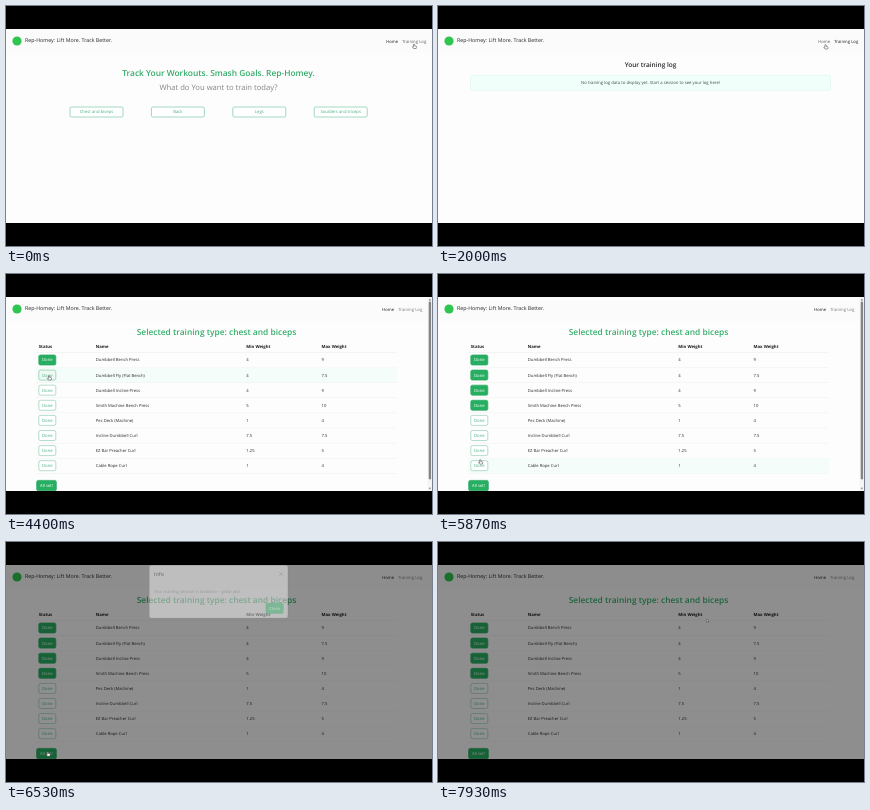
An HTML page with a canvas for the animation above (8000 ms loop, 426 by 240 pixels).

```html
<!DOCTYPE html>
<html lang="en">
<head>
<meta charset="utf-8">
<title>Training log</title>
<style>
html, body { margin: 0; width: 100%; height: 100%; overflow: hidden; background: #000; }
canvas { display: block; width: 100vw; height: 100vh; }
</style>
</head>
<body>
<canvas id="stage"></canvas>
<script>
const W = 426, H = 240, LOOP = 8000;
const TOP = 23, BOTTOM = 217;
const canvas = document.getElementById('stage');
const ctx = canvas.getContext('2d');
const FONT = '"Open Sans", "Noto Sans", sans-serif';
const GREEN = '#27ae60', TEAL = '#45b083', INK = '#25282b';
const BRAND = 'Rep-Homey';

const GROUPS = ['Chest and biceps', 'Back', 'Legs', 'Soulders and triceps'];
const EXERCISES = [
  ['Dumbbell Bench Press', 4, 9],
  ['Dumbbell Fly (Flat Bench)', 4, 7.5],
  ['Dumbbell Incline Press', 4, 9],
  ['Smith Machine Bench Press', 5, 10],
  ['Pec Deck (Machine)', 1, 4],
  ['Incline Dumbbell Curl', 7.5, 7.5],
  ['EZ Bar Preacher Curl', 1.25, 5],
  ['Cable Rope Curl', 1, 4]
];

// Moments of the session, in ms
const T = { log: 130, home: 2130, group: 3330, modal: 6270, close: 7760 };
const DONE_AT = [4130, 4530, 4970, 5420];
// Pointer stops: time, x, y
const PATH = [
  [0, 408, 38], [200, 408, 38], [870, 335, 84], [1000, 328, 87], [1200, 328, 87],
  [1900, 387.5, 38.5], [2200, 387.5, 38.5], [2910, 105, 107], [3450, 105, 107],
  [3950, 43, 87], [4180, 43, 87], [4360, 43, 101.5], [4580, 43, 101.5],
  [4800, 43, 116.5], [5020, 43, 116.5], [5260, 43, 131.5], [5480, 43, 131.5],
  [6100, 41.8, 209.7], [6930, 41.8, 209.7], [7190, 280.6, 83.3], [7260, 280.6, 83.3],
  [7560, 268.8, 77], [8000, 268.8, 77]
];

const clamp = v => Math.max(0, Math.min(1, v));
const ramp = (t, start, length) => clamp((t - start) / length);
const ease = p => p * p * (3 - 2 * p);

function pointerAt(t) {
  let i = 1;
  while (i < PATH.length - 1 && PATH[i][0] < t) i++;
  const [t0, x0, y0] = PATH[i - 1], [t1, x1, y1] = PATH[i];
  const p = ease(clamp((t - t0) / (t1 - t0)));
  return { x: x0 + (x1 - x0) * p, y: y0 + (y1 - y0) * p };
}

function text(str, x, y, size, color = INK, weight = 400, align = 'left') {
  ctx.font = `${weight} ${size}px ${FONT}`;
  ctx.textRendering = 'geometricPrecision';
  ctx.textAlign = align;
  ctx.textBaseline = 'alphabetic';
  ctx.fillStyle = color;
  ctx.fillText(str, x, y + size * 0.35);
}

function box(x, y, w, h, r, fill, stroke, line = 0.5) {
  ctx.beginPath();
  ctx.roundRect(x, y, w, h, r);
  if (fill) { ctx.fillStyle = fill; ctx.fill(); }
  if (stroke) { ctx.strokeStyle = stroke; ctx.lineWidth = line; ctx.stroke(); }
}

function rect(x, y, w, h, color) {
  ctx.fillStyle = color;
  ctx.fillRect(x, y, w, h);
}

// Outline button that fills by the given amount
function button(label, x, y, w, h, fill, edge = TEAL) {
  box(x, y, w, h, 1.6, '#fff', edge);
  ctx.save();
  ctx.globalAlpha *= fill;
  box(x, y, w, h, 1.6, GREEN, GREEN);
  ctx.restore();
  const cx = x + w / 2, cy = y + h / 2;
  if (fill < 1) text(label, cx, cy, 4.25, TEAL, 400, 'center');
  ctx.save();
  ctx.globalAlpha *= fill;
  text(label, cx, cy, 4.25, '#fff', 400, 'center');
  ctx.restore();
}

function navbar(page, shift, t) {
  rect(0, TOP, W, 24, '#fbfbfb');
  ctx.beginPath();
  ctx.arc(11, 35, 4.6, 0, 7);
  ctx.fillStyle = '#2fc551';
  ctx.fill();
  text(BRAND + ': Lift More. Track Better.', 19, 34.6, 5.3, INK);
  const overHome = t > 1830 && t < 2260, overLog = t < 260;
  const shade = (active, over) => active ? '#1c1f22' : over ? '#606060' : '#7c7c7c';
  text('Home', 380 - shift, 35.7, 4.25, shade(page !== 'log', overHome));
  text('Training Log', 396.2 - shift, 35.7, 4.25, shade(page === 'log', overLog));
}

function homePage(t) {
  text(`Track Your Workouts. Smash Goals. ${BRAND}.`, 212.5, 67, 8.4, '#32ad69', 600, 'center');
  text('What do You want to train today?', 212.5, 81, 7.65, '#858585', 500, 'center');
  GROUPS.forEach((name, i) => {
    const hover = i ? 0 : ramp(t, 2915, 160);
    button(name, 64 + i * 81.4, 101, 53, 10, hover);
  });
}

function logPage() {
  text('Your training log', 212.5, 58.6, 6.5, INK, 600, 'center');
  box(32.5, 69.2, 360, 15.2, 1.6, '#f0fffa', '#d7f3e8');
  text('No training log data to display yet. Start a session to see your log here!',
    212.5, 77, 4.25, '#3f4a46', 400, 'center');
}

function trainingPage(t, pointer) {
  text('Selected training type: chest and biceps', 210.5, 58, 8.4, '#32ad69', 600, 'center');
  const cols = [32.7, 89.8, 240.3, 315.5];
  ['Status', 'Name', 'Min Weight', 'Max Weight'].forEach((label, i) =>
    text(label, cols[i], 72.8, 4.25, '#181a1c', 700));
  rect(30, 78.4, 361, 0.4, '#e4e8e6');
  EXERCISES.forEach(([name, low, high], i) => {
    const y = 86 + i * 15.1;
    if (t < T.modal && Math.abs(pointer.y - y) < 7.5) rect(30, y - 7.4, 361, 14.9, '#f5fdfa');
    rect(30, y + 7.4, 361, 0.4, '#e9ecea');
    const hover = DONE_AT[i] ? ramp(t, DONE_AT[i] - 140, 150) : 0;
    button('Done', 32.8, y - 5, 17, 10, hover, '#6dbb99');
    text(name, cols[1], y, 4.18);
    text(low, cols[2], y, 4.18);
    text(high, cols[3], y, 4.18);
  });
  button('All set!', 30.7, 206.4, 19.6, 10.4, 1);
  if (t < T.modal) scrollbar();
}

function scrollbar() {
  rect(421.8, TOP, 4.2, BOTTOM - TOP, '#f4f4f4');
  box(422.7, 27.5, 2.4, 178, 1.2, '#858585');
  ctx.fillStyle = '#777';
  [[24.6, 26.4], [215.6, 213.8]].forEach(([tip, base]) => {
    ctx.beginPath();
    ctx.moveTo(423.9, tip);
    ctx.lineTo(425, base);
    ctx.lineTo(422.8, base);
    ctx.fill();
  });
}

function modal(t) {
  const shown = t < T.close ? ramp(t, T.modal + 150, 260) : 1 - ramp(t, T.close, 150);
  if (!shown) return;
  ctx.save();
  ctx.globalAlpha = shown;
  ctx.translate(0, -13 * (1 - ease(shown)));
  box(143.3, 31.2, 138.6, 52.8, 2.2, '#fff', '#777', 0.3);
  text('Info', 147.8, 40.3, 5.3, INK, 600);
  ctx.beginPath();
  ctx.moveTo(273.2, 38);
  ctx.lineTo(277.2, 42);
  ctx.moveTo(277.2, 38);
  ctx.lineTo(273.2, 42);
  ctx.strokeStyle = '#777';
  ctx.lineWidth = 0.7;
  ctx.stroke();
  text('Your training session is locked in – great job!', 147.8, 57, 4.22, '#666');
  box(259.6, 69, 18, 10.6, 1.6, GREEN);
  text('Close', 268.6, 74.3, 4.2, '#fff', 600, 'center');
  ctx.restore();
}

function drawPointer({ x, y }, hand) {
  const shape = hand
    ? [0, 0, .7, .4, .7, 2, 2.5, 2.4, 2.8, 3, 2.4, 5, -.5, 5, -1.8, 3.2, -1.4, 2.7, -.6, 3.2, -.6, .4]
    : [0, 0, 0, 4.1, .9, 3.3, 1.6, 4.7, 2.2, 4.4, 1.6, 3.1, 2.8, 3];
  const scale = hand ? 0.9 : 0.75;
  ctx.beginPath();
  for (let i = 0; i < shape.length; i += 2) {
    ctx.lineTo(x + shape[i] * scale, y + shape[i + 1] * scale);
  }
  ctx.closePath();
  ctx.fillStyle = '#fff';
  ctx.fill();
  ctx.strokeStyle = '#222';
  ctx.lineWidth = 0.45;
  ctx.stroke();
}

function overLink(t) {
  return t < 260 || (t > 1830 && t < 2260) || (t > 2890 && t < 3480) ||
    (t > 3890 && t < 7000) || (t > 7480 && t < T.close + 100);
}

function render(t) {
  const page = t < T.log ? 'home' : t < T.home ? 'log' : t < T.group ? 'home' : 'training';
  const pointer = pointerAt(t);
  rect(0, 0, W, H, '#000');
  ctx.save();
  ctx.beginPath();
  ctx.rect(0, TOP, W, BOTTOM - TOP);
  ctx.clip();
  rect(0, TOP, W, BOTTOM - TOP, '#fdfdfd');
  navbar(page, page === 'training' ? 4 : 0, t);
  if (page === 'home') homePage(t);
  else if (page === 'log') logPage();
  else trainingPage(t, pointer);
  rect(0, TOP, W, BOTTOM - TOP, `rgba(0,0,0,${0.44 * ramp(t, T.modal, 150)})`);
  modal(t);
  drawPointer(pointer, overLink(t));
  ctx.restore();
}

function frame(now) {
  const ratio = window.devicePixelRatio || 1;
  const w = Math.round(innerWidth * ratio), h = Math.round(innerHeight * ratio);
  if (canvas.width !== w || canvas.height !== h) {
    canvas.width = w;
    canvas.height = h;
  }
  ctx.setTransform(w / W, 0, 0, h / H, 0, 0);
  render(now % LOOP);
  requestAnimationFrame(frame);
}
requestAnimationFrame(frame);
</script>
</body>
</html>
```
